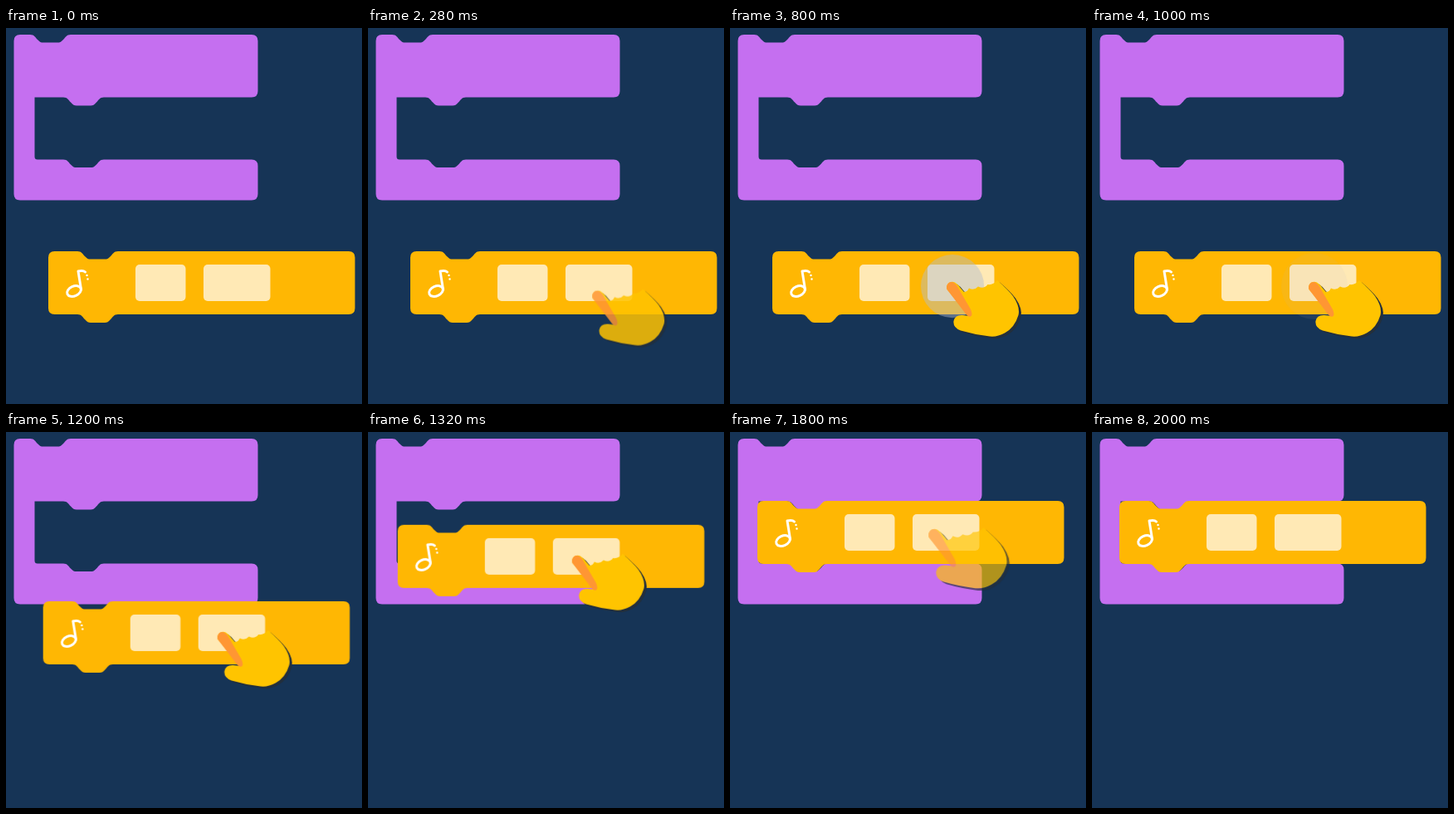
An HTML page that plays this animation: 429 by 453 pixels, repeating every 2.04 s.

```html
<!DOCTYPE html>
<html lang="en">
<head>
<meta charset="utf-8">
<title>Drag a block into the loop</title>
<style>
  html, body { margin: 0; width: 100%; height: 100%; overflow: hidden; background: #163456; }
  svg { display: block; width: 429px; height: 453px; }

  .drag, .enter, .leave, .ripple { animation: 2040ms linear infinite; }
  .drag { animation-name: drag; }
  .enter { animation-name: enter; }
  .leave { animation-name: leave; transform-origin: 306px 339px; }
  .ripple { animation-name: grow, fade; transform-origin: 268px 311px; }

  @keyframes enter {
    0%, 3.53% {
      transform: translate(62px, 72px); opacity: 0;
      animation-timing-function: cubic-bezier(.33, 1, .68, 1);
    }
    25.1%, 100% { transform: none; opacity: 1; }
  }
  @keyframes grow {
    0%, 24.75% { transform: scale(0); animation-timing-function: cubic-bezier(.25, 1, .5, 1); }
    51.47%, 100% { transform: scale(1); }
  }
  @keyframes fade {
    0%, 24.75% { opacity: 1; }
    51.47%, 100% { opacity: 0; }
  }
  @keyframes drag {
    0%, 52.11% { transform: none; animation-timing-function: cubic-bezier(.4, 0, .33, 1); }
    72.55%, 100% { transform: translate(-18px, -186px); }
  }
  @keyframes leave {
    0%, 83.33% { transform: scale(1); opacity: 1; }
    98.04%, 100% { transform: scale(1.25); opacity: 0; }
  }
</style>
</head>
<body>
<svg viewBox="0 0 429 453">
  <defs>
    <path id="palm" d="M261.500 315
      C259.500 309 265 303.500 271 306.500 Q275 309 278.500 314
      L282 318 Q286 318 288 313.500 Q294 317 299 311.500 Q306 315 310.500 309
      Q317 310 322 304 Q335 315 341 323 Q350 336 347.500 346
      Q343 361 331 367.500 Q322 372.500 313 371.500
      Q295 369.500 278 364.500 Q268.500 361 269.500 353 Q271 345.500 280 346 L289 347 Z"/>
  </defs>

  <!-- loop block -->
  <path fill="#c56ff0" d="M17 8 H29
    c5 0 6 3 9 6 s4 3.500 7 3.500 h17 c3 0 4-.5 7-3.500 s4-6 9-6
    H296 q7.500 0 7.500 7.500 V76 q0 7.500-7.500 7.500 H118
    c-5 0-6 3-9 6 s-4 4-7 4 h-17 c-3 0-4-1-7-4 s-4-6-9-6
    H34.500 V155 q0 3.500 3.500 3.500 H69
    c5 0 6 3 9 6 s4 3.500 7 3.500 h17 c3 0 4-.5 7-3.500 s4-6 9-6
    H296 q7.500 0 7.500 7.500 V200 q0 7.500-7.500 7.500 H17 q-7.500 0-7.500-7.500 V15.500 Q9.500 8 17 8 Z"/>

  <!-- note block -->
  <g class="drag">
    <path fill="#ffb703" d="M58.500 269 H86
      c5 0 6 3 9 6 s4 3.500 7 3.500 h17 c3 0 4-.5 7-3.500 s4-6 9-6
      H413 q7.500 0 7.500 7.500 V337.500 q0 7.500-7.500 7.500 H135
      c-5 0-6 3-9 6 s-4 4-7 4 h-17 c-3 0-4-1-7-4 s-4-6-9-6
      H58.500 q-7.500 0-7.500-7.500 V276.500 Q51 269 58.500 269 Z"/>
    <g fill="#ffe9b5">
      <rect x="156" y="285" width="60.500" height="44" rx="5"/>
      <rect x="238" y="285" width="80.500" height="44" rx="5"/>
    </g>
    <g fill="none" stroke="#fff" stroke-width="3" stroke-linecap="round" stroke-linejoin="round">
      <ellipse cx="82" cy="317" rx="8.800" ry="5.800" transform="rotate(-24 82 317)"/>
      <path d="M90.500 315 L87 293 Q93 291.500 95.500 294"/>
      <path d="M97.500 298 V298.100 M98.500 302.500 V302.600" stroke-width="2.500"/>
    </g>
  </g>

  <circle class="ripple" cx="268" cy="311" r="40" fill="#b3bdcf"/>

  <!-- hand -->
  <g class="drag"><g class="enter"><g class="leave">
    <use href="#palm" x="3" y="2.500" fill="#232f3c"/>
    <use href="#palm" fill="#ffc400"/>
    <path fill="#ff9633" d="M261.500 315 C259.500 309 265 303.500 270 307
      Q273 309 275.500 314 L290 339 Q293 346 290 347.500 Q287 349 283 343 Z"/>
  </g></g></g>
</svg>
</body>
</html>
```
